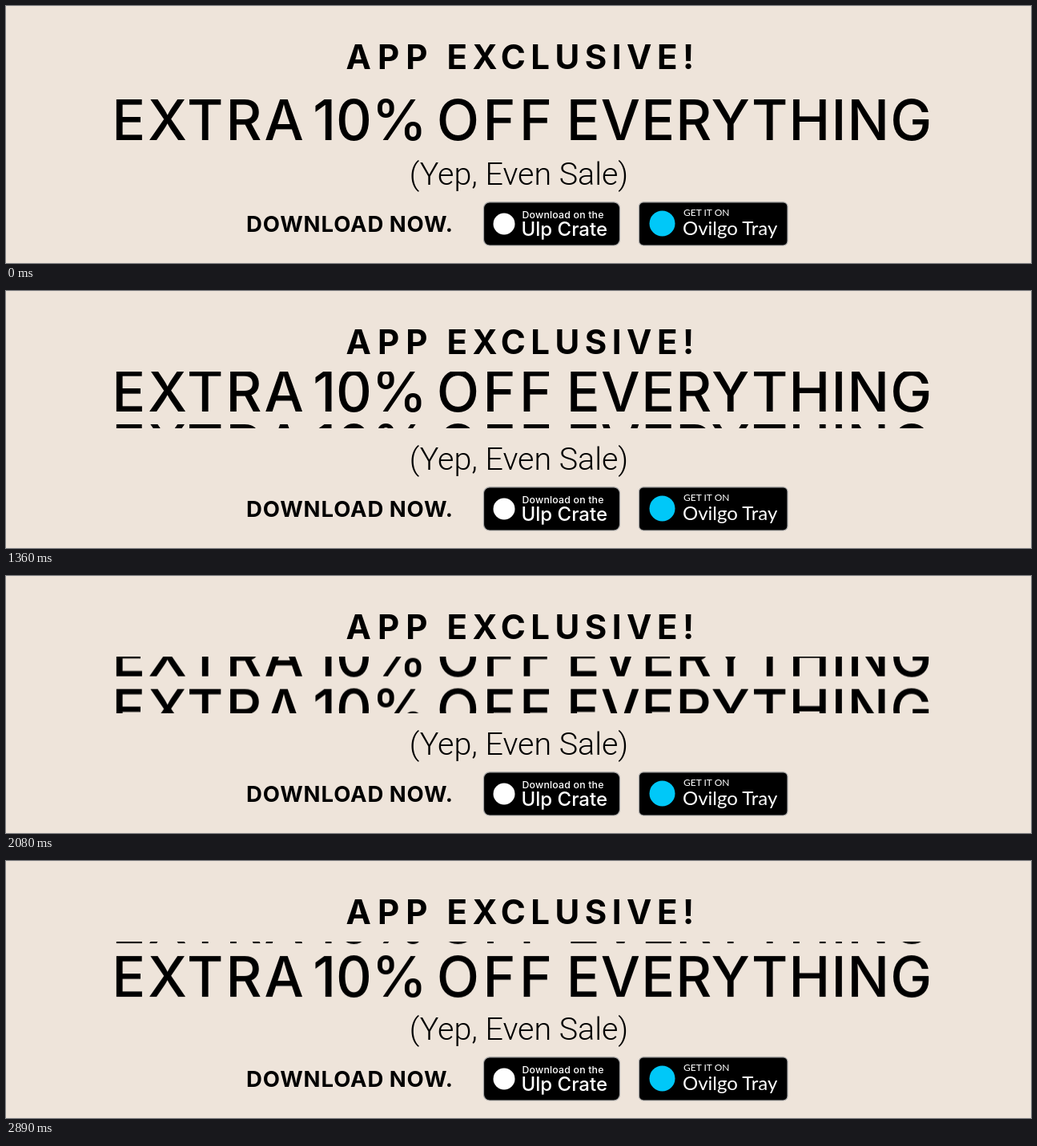
Recreate the animation shown at these times as an HTML page. Size 1280x322 px, loop 2.98 s.

```html
<!DOCTYPE html>
<html lang="en">
<head>
<meta charset="utf-8">
<title>App offer banner</title>
<style>
  html, body { margin: 0; width: 100%; height: 100%; overflow: hidden; background: #eee4da; }
  svg { display: block; width: 1280px; height: 322px; font-family: Inter, sans-serif; }
  .mid { text-anchor: middle; }
  .title { font-size: 42px; font-weight: 700; }
  .offer { font-size: 69.5px; font-weight: 500; }
  .note { font: 300 39.4px Roboto, sans-serif; }
  .call { font-size: 27.5px; font-weight: 700; letter-spacing: .9px; word-spacing: -1px; }
  .badge { fill: #000; stroke: #a6a6a6; stroke-width: 1.2; }
  .label { fill: #fff; font-weight: 500; }
  .alt { font-family: Lato, sans-serif; font-weight: 400; }
  .small { font-size: 12.3px; letter-spacing: .2px; }
  .alt.small { font-size: 12px; letter-spacing: 0; }
  .store { font-size: 24px; }
</style>
</head>
<body>
<svg viewBox="0 0 1280 322">
  <defs>
    <clipPath id="window"><rect x="0" y="101" width="1280" height="71"/></clipPath>
    <g id="offer" class="offer mid">
      <text x="253.5" y="167.5" letter-spacing="3">EXTRA</text>
      <text x="454.5" y="167.5">10%</text>
      <text x="612" y="167.5" letter-spacing="4.5">OFF</text>
      <text x="928.5" y="167.5" letter-spacing="1.1">EVERYTHING</text>
    </g>
  </defs>

  <g class="title mid">
    <text x="479.5" y="79" letter-spacing="8">APP</text>
    <text x="708" y="79" letter-spacing="6.5">EXCLUSIVE!</text>
  </g>

  <g clip-path="url(#window)">
    <g id="roll">
      <use href="#offer"/>
      <use href="#offer" y="67"/>
    </g>
  </g>

  <text class="note mid" x="640.5" y="224">(Yep, Even Sale)</text>
  <text class="call" x="300" y="283">DOWNLOAD NOW.</text>

  <rect class="badge" x="596.5" y="245.8" width="170" height="54.2" rx="7.5"/>
  <circle cx="622" cy="273" r="13.5" fill="#fff"/>
  <text class="label small" x="644.5" y="266">Download on the</text>
  <text class="label store" x="643.5" y="288">Ulp Crate</text>

  <rect class="badge" x="790.5" y="245.8" width="185.5" height="54.2" rx="5.5"/>
  <circle cx="819.5" cy="272.5" r="16" fill="#00c8f8"/>
  <text class="label alt small" x="846" y="263">GET IT ON</text>
  <text class="label alt store" x="845" y="287">Ovilgo Tray</text>
</svg>
<script>
  const LOOP = 2980, HOLD = 1000, STEP = 90, STEPS = 22, SLOW_FROM = 11;

  // The roll loses speed halfway through.
  const shift = k => 3.4 * Math.min(k, SLOW_FROM) + 2.5 * Math.max(k - SLOW_FROM, 0);

  const pose = (k, time) => ({
    offset: time / LOOP,
    transform: `translateY(${-shift(k)}px)`,
    easing: 'steps(1, end)'
  });

  const poses = [pose(0, 0)];
  for (let k = 1; k <= STEPS; k++) poses.push(pose(k, HOLD + STEP * (k - 1)));
  poses.push(pose(STEPS, LOOP));

  const roll = document.getElementById('roll').animate(poses, { duration: LOOP, iterations: Infinity });
  roll.startTime = 0;
</script>
</body>
</html>
```
